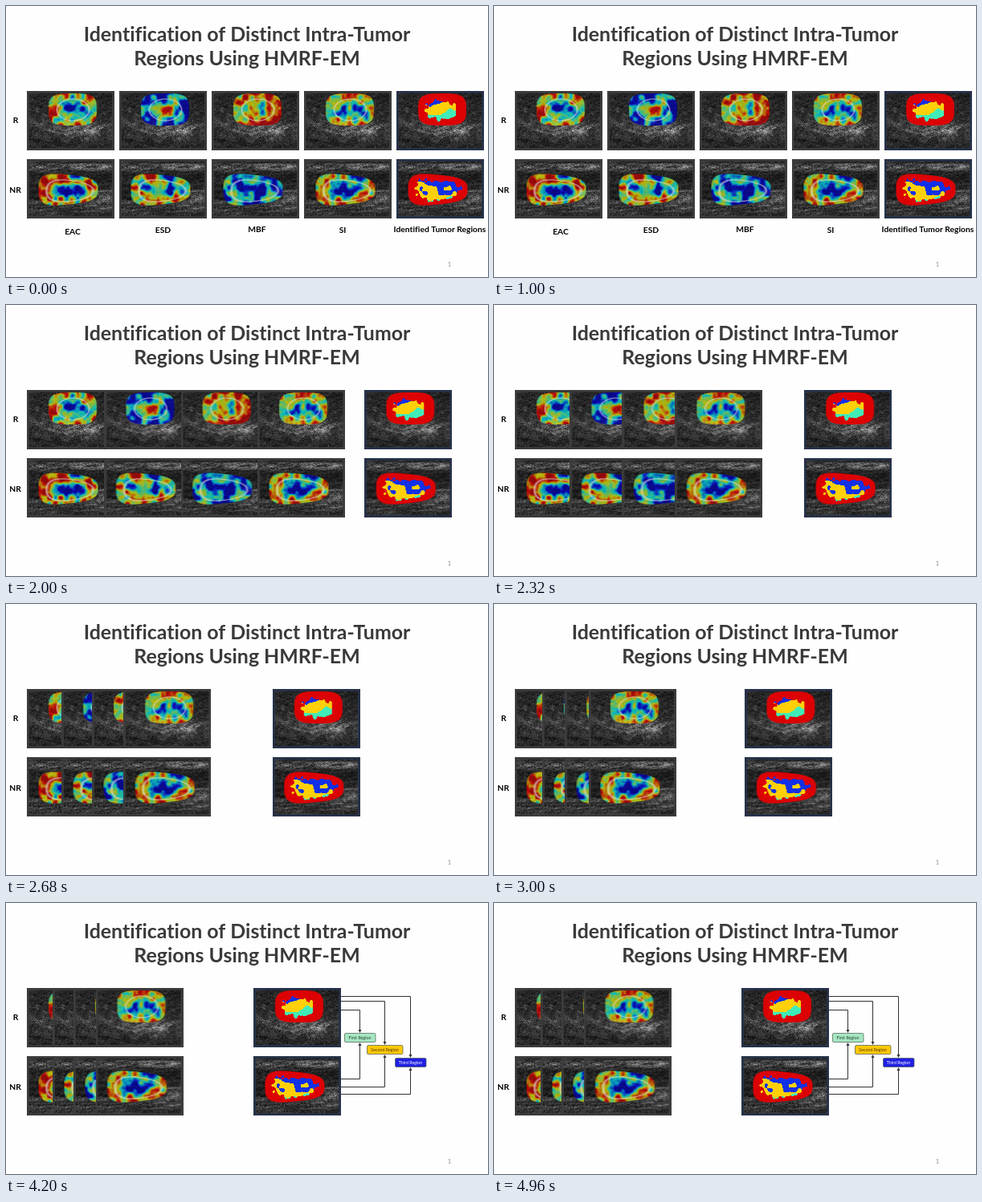
Animation of 600x338 px, one loop 5 s. Source, as an HTML page with a canvas:

```html
<!DOCTYPE html>
<html lang="en">
<head>
<meta charset="utf-8">
<title>Intra-Tumor Regions</title>
<style>
html, body { margin: 0; width: 100%; height: 100%; overflow: hidden; background: #fefefe; }
canvas { display: block; width: 600px; height: 338px; }
</style>
</head>
<body>
<canvas id="stage" width="600" height="338"></canvas>
<script>
const LOOP = 5000, W = 109, H = 74;
const FONT = 'Lato, Carlito, sans-serif';
const stage = document.getElementById('stage').getContext('2d');

const clamp = (v, lo = 0, hi = 1) => Math.min(hi, Math.max(lo, v));
const mix = (a, b, p) => a + (b - a) * p;
const bump = (x, y, cx, cy, rx, ry) => Math.exp(-(((x - cx) / rx) ** 2) - ((y - cy) / ry) ** 2);

function hash(x, y, seed) {
  let h = Math.imul(x, 374761393) + Math.imul(y, 668265263) + Math.imul(seed, 974634777);
  h = Math.imul(h ^ (h >>> 13), 1274126177);
  return ((h ^ (h >>> 16)) >>> 0) / 4294967296;
}

function noise(x, y, seed) {
  const ix = Math.floor(x), iy = Math.floor(y);
  const fade = f => f * f * (3 - 2 * f);
  const u = fade(x - ix), v = fade(y - iy);
  return mix(mix(hash(ix, iy, seed), hash(ix + 1, iy, seed), u),
             mix(hash(ix, iy + 1, seed), hash(ix + 1, iy + 1, seed), u), v);
}

const wobble = (x, y, scale, seed) => noise(x / scale, y / scale, seed) - 0.5;

function layer(w, h) {
  const c = document.createElement('canvas');
  c.width = w;
  c.height = h;
  return c.getContext('2d');
}

function paint(shade) {
  const g = layer(W, H), img = g.createImageData(W, H);
  for (let y = 0; y < H; y++)
    for (let x = 0; x < W; x++) img.data.set([...shade(x, y), 255], (y * W + x) * 4);
  g.putImageData(img, 0, 0);
  return g;
}

// Superellipse that narrows to the right; at(x, y).d is 1 on the outline
function shape(cx, cy, rx, ry, power, taper) {
  return {
    at(x, y) {
      const u = (x - cx) / rx, v = (y - cy) / (ry * (1 - taper * clamp(u, -1, 1)));
      return { u, v, d: (Math.abs(u) ** power + Math.abs(v) ** power) ** (1 / power) };
    },
    cover(x, y) { return clamp((1 - this.at(x, y).d) * ry + 0.5); },
    line(x, y) { return clamp(1.1 - Math.abs(1 - this.at(x, y).d) * ry); }
  };
}

const speckle = (x, y) => 0.3 + 0.8 * hash(x, y, 5) + 0.6 * noise(x / 2, y / 1.5, 6);

function tissueR(x, y) {
  const slope = x < 50 ? 0.22 : -0.42;
  const streak = noise(x / 12, (y - slope * (x - 50)) / 3, 3);
  const band = bump(x, y, 74, 50, 36, 13) + 0.4 * bump(x, y, 18, 38, 26, 16);
  return (26 + 22 * streak + band * (30 + 70 * streak * streak)) * speckle(x, y);
}

function tissueNR(x, y) {
  const streak = noise(x / 16, (y + 0.05 * x) / 2.2, 9);
  const light = bump(0, y, 0, 9, 1, 6) + bump(x, y, 98, 42, 24, 9) + 0.7 * bump(0, y, 0, 60, 1, 9);
  return (22 + 22 * streak + light * (18 + 75 * streak * streak)) * speckle(x, y);
}

const jet = v => [3, 2, 1].map(c => 235 * clamp(1.5 - Math.abs(4 * v - c)));

const RED = [220, 2, 4], BLUE = [16, 48, 232], YELLOW = [255, 208, 8], CYAN = [64, 236, 184];

// maps: [outer level, change towards the cores]; split: slope, end of blue, start of cyan, roughness
const rows = [
  {
    y: 106, tissue: tissueR,
    mask: shape(56.5, 22.5, 30, 20, 3.4, 0),
    ring: shape(57, 23, 20, 13.5, 2, 0),
    tumor: shape(55, 23, 18.5, 12.5, 2.2, 0),
    cores: [[57, 23, 18, 12]],
    maps: [[0.7, -0.55], [0.14, 0.55], [0.8, -0.4], [0.65, -0.4]],
    split: [0.3, -0.55, 0.25, 0.8]
  },
  {
    y: 191, tissue: tissueNR,
    mask: shape(51, 37.5, 37, 18.5, 3.2, 0.2),
    ring: shape(53, 39, 29, 13, 2.4, 0.25),
    tumor: shape(52, 38, 27, 11.5, 2.4, 0.3),
    cores: [[53, 38, 24, 9], [66, 21, 13, 7]],
    maps: [[0.74, -0.6], [0.68, -0.58], [0.3, -0.2], [0.68, -0.56]],
    split: [-0.3, 0, 0.95, 2]
  }
];

function addFrame(g, color) {
  g.strokeStyle = color;
  g.lineWidth = 2.8;
  g.lineJoin = 'round';
  g.strokeRect(1.4, 1.4, W - 2.8, H - 2.8);
  return g.canvas;
}

function heatPanel(row, [outer, change], seed) {
  return addFrame(paint((x, y) => {
    const gray = row.tissue(x, y);
    const core = Math.max(...row.cores.map(c => bump(x, y, ...c)));
    const level = outer + change * core + 0.75 * wobble(x, y, 7, seed) + 0.2 * wobble(x, y, 3, seed + 1);
    const alpha = 0.74 * row.mask.cover(x, y), line = 0.6 * row.ring.line(x, y);
    return jet(clamp(level, 0.06, 0.93)).map(c => mix(mix(gray, c, alpha), 225, line));
  }), '#3c3c3c');
}

function regionPanel(row) {
  const [slope, blueEnd, cyanStart, rough] = row.split;
  return addFrame(paint((x, y) => {
    const { u, v, d } = row.tumor.at(x, y);
    let color = RED;
    if (d + 0.5 * wobble(x, y, 4, 31) < 1) {
      const level = v + slope * u + rough * wobble(x, y, 6, 32);
      color = level < blueEnd ? BLUE : level < cyanStart ? YELLOW : CYAN;
    }
    return color.map(c => mix(row.tissue(x, y), c, row.mask.cover(x, y)));
  }), '#27324a');
}

rows.forEach((row, r) => {
  row.panels = row.maps.map((map, i) => heatPanel(row, map, 40 + r * 20 + i * 3));
  row.panels.push(regionPanel(row));
});

const startX = [26, 141, 256, 371, 486];
const endX = [26, 58, 84, 111.5, 308];

function text(g, str, x, y, size, color, weight = 700) {
  g.font = `${weight} ${size}px ${FONT}`;
  g.letterSpacing = '0.01px'; // turns ligatures off
  g.textAlign = 'center';
  g.fillStyle = color;
  g.fillText(str, x, y);
}

function arrow(g, y0, x, y1) {
  const s = Math.sign(y1 - y0);
  g.beginPath();
  g.moveTo(416, y0);
  g.lineTo(x, y0);
  g.lineTo(x, y1 - 3 * s);
  g.stroke();
  g.beginPath();
  g.moveTo(x, y1);
  g.lineTo(x - 2, y1 - 4 * s);
  g.lineTo(x + 2, y1 - 4 * s);
  g.fill();
}

function regionBox(g, { name, x, y, w, fill, ink, ax, top, low }) {
  g.strokeStyle = g.fillStyle = '#333';
  g.lineWidth = 1;
  arrow(g, top, ax, y);
  arrow(g, low, ax, y + 12);
  g.beginPath();
  g.roundRect(x + 0.5, y + 0.5, w - 0.5, 11, 1.5);
  g.fillStyle = fill;
  g.fill();
  g.strokeStyle = '#4a5a50';
  g.lineWidth = 0.7;
  g.stroke();
  text(g, name, x + w / 2, y + 8, 5.3, ink, 400);
}

const boxes = [
  { name: 'First Region', x: 421, y: 162, w: 39, fill: '#a5e6c3', ink: '#254034', ax: 440.5, top: 133.5, low: 219.5 },
  { name: 'Second Region', x: 449, y: 177, w: 45, fill: '#ffc80a', ink: '#4a3a05', ax: 471.5, top: 122.5, low: 229.5 },
  { name: 'Third Region', x: 484, y: 193, w: 39, fill: '#2020e4', ink: '#ffffff', ax: 503.5, top: 116.5, low: 238.5 }
];
const links = layer(600, 338);

// Soft-edged wipe from the left
function wipeLinks(p) {
  if (p <= 0) return;
  const g = links, soft = 22, edge = 416 + p * (108 + soft);
  g.globalCompositeOperation = 'source-over';
  g.clearRect(0, 0, 600, 338);
  boxes.forEach(box => regionBox(g, box));
  const fade = g.createLinearGradient(edge - soft, 0, edge, 0);
  fade.addColorStop(0, '#000');
  fade.addColorStop(1, 'rgba(0,0,0,0)');
  g.globalCompositeOperation = 'destination-in';
  g.fillStyle = fade;
  g.fillRect(0, 0, 600, 338);
  stage.drawImage(g.canvas, 0, 0);
}

const ease = u => u < 0.5 ? 4 * u ** 3 : 1 - 4 * (1 - u) ** 3;
const labels = [['EAC', 83, 285], ['ESD', 195.5, 283], ['MBF', 312.5, 282], ['SI', 419, 283], ['Identified Tumor Regions', 540, 282]];

function draw(t) {
  const g = stage;
  g.fillStyle = '#fefefe';
  g.fillRect(0, 0, 600, 338);
  text(g, 'Identification of Distinct Intra-Tumor', 300, 44, 24.9, '#3a3a3a');
  text(g, 'Regions Using HMRF-EM', 300, 74, 24.9, '#3a3a3a');
  text(g, 'R', 12, 146, 10.3, '#000');
  text(g, 'NR', 11.5, 233, 10.3, '#000');
  text(g, '1', 552, 325, 7.5, '#8c8c8c', 400);

  g.globalAlpha = 1 - clamp((t - 1200) / 560);
  for (const [name, x, y] of labels) text(g, name, x, y, 10.3, '#000');
  g.globalAlpha = 1;

  const p = ease(clamp((t - 1122) / 2300));
  for (const row of rows)
    row.panels.forEach((panel, i) => g.drawImage(panel, mix(startX[i], endX[i], p), row.y));
  wipeLinks(clamp((t - 3320) / 520));
}

function tick() {
  draw(performance.now() % LOOP);
  requestAnimationFrame(tick);
}
tick();
</script>
</body>
</html>
```
